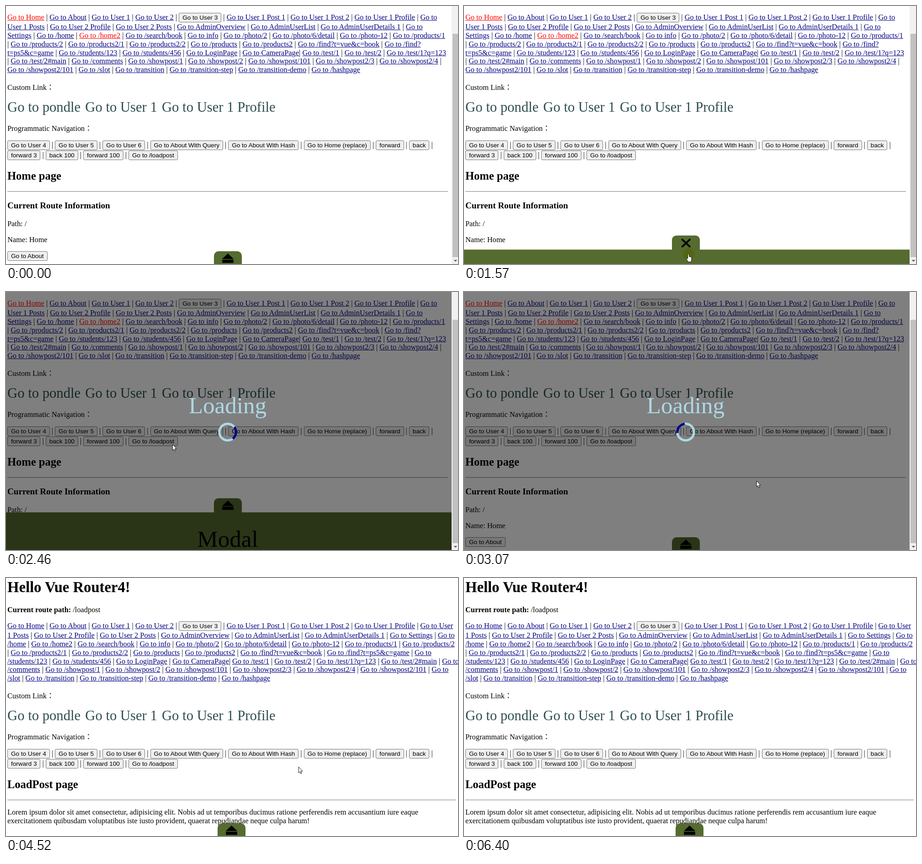
Recreate the animation shown at these times as an HTML page. Size 989x566 px, loop 6.82 s.

```html
<!DOCTYPE html>
<html lang="en">
<head>
<meta charset="utf-8">
<title>Route loading</title>
<style>
html, body { margin: 0; width: 100%; height: 100%; overflow: hidden; background: #fff; }
#stage { position: relative; width: 989px; height: 566px; overflow: hidden; background: #fff;
  font-family: 'Liberation Serif', 'Noto Sans CJK JP', serif; color: #000; }
#stage div, #stage svg { position: absolute; }
.page { inset: 0; }
.line { left: 3px; font-size: 16.35px; line-height: 20px; white-space: pre; }
.line a { color: #000080; text-decoration: underline; }
.line a.on { color: #f00; }
.btn { font: 13.58px/0 'Liberation Sans', sans-serif; padding: 2px 6.9px;
  border: 1px solid #767676; border-radius: 3px; background: #efefef; }
.btn.hover { background: #e5e5e5; border-color: #4f4f4f; }
.btn.down { background: #f5f5f5; border-color: #8d8d8d; }
.big { color: #2f4f4f; margin-right: 10.2px; }
.rule { left: 3px; height: 1px; background: #a6a6a6; border-bottom: 1px solid #c8c8c8; }
#bar { left: 975px; top: 0; width: 14px; height: 566px; background: #f1f1f1; }
#thumb { left: 2px; top: 61px; width: 12px; height: 490px; background: #c1c1c1; }
#tab { top: 420px; width: 61px; height: 32px; border-radius: 10px 10px 0 0; background: #556b2f; }
#panel { left: 0; top: 451px; width: 975px; height: 125px; background: #556b2f; }
.title { left: 0; width: 970px; text-align: center; font-size: 51.1px; line-height: 58px; }
#veil { left: 0; top: 0; width: 975px; height: 566px; background: rgba(0, 0, 0, .5); }
#veil .title { color: #add8e6; top: 220px; }
#glow { width: 25px; height: 25px; margin: -12.5px; border-radius: 50%; background: #faef62; mix-blend-mode: multiply; }
svg { left: 0; top: 0; overflow: visible; }
</style>
</head>
<body>
<div id="stage">
  <div id="home" class="page"></div>
  <div id="post" class="page"></div>
  <div id="modal">
    <div id="tab">
      <svg width="61" height="32">
        <path id="eject" d="M30.5 5L43.2 17H17.8ZM18.2 18.4H42.8V25.6H18.2Z"/>
        <path id="cross" d="M21.5 8L40 25.5M40 8L21.5 25.5" stroke="#000" stroke-width="3.8"/>
      </svg>
    </div>
    <div id="panel"><div class="title" style="top:30px">Modal</div></div>
  </div>
  <div id="veil">
    <div class="title">Loading</div>
    <svg width="975" height="566" fill="none" stroke-width="5.1">
      <circle cx="485" cy="307.3" r="18.2" stroke="#add8e6"/>
      <circle id="arc" cx="485" cy="307.3" r="18.2" stroke="#000080" pathLength="100" stroke-dasharray="25 75"/>
    </svg>
  </div>
  <div id="bar">
    <div id="thumb"></div>
    <svg width="14" height="566"><path d="M4.5 557H12.5L8.5 561Z" fill="#606060"/></svg>
  </div>
  <div id="glow"></div>
  <svg id="cursor" width="20" height="20" fill="#fff" stroke="#000" stroke-width=".9" stroke-linejoin="round">
    <path id="arrow" d="M.2 .4V13.4L3 10.7L4.9 15.2L7 14.3L5.1 9.9H9Z"/>
    <path id="hand" d="M-1.4 9.5V1.2a1.4 1.4 0 0 1 2.8 0V5.6L5.6 6.6Q7.2 7.2 7 9V12.4L5.6 17.4H-.4L-3.6 12.2Q-4.8 10-3.2 9.3Q-2.2 9.2-1.4 10.6Z"/>
    <path id="beam" d="M-2.5 .5H2.5M0 .5V12.5M-2.5 12.5H2.5"/>
  </svg>
</div>
<script>
const LOOP = 6820;
const $ = id => document.getElementById(id);

// "~" breaks the line on the home page, "^" on the post page, "%" breaks without a space.
const LINKS = 'Go to Home | Go to About | Go to User 1 | Go to User 2 | [Go to User 3] | Go to User 1 Post 1 | ' +
  'Go to User 1 Post 2 | Go to User 1 Profile | Go to~User^1 Posts | Go to User 2 Profile | Go to User 2 Posts | ' +
  'Go to AdminOverview | Go to AdminUserList | Go to AdminUserDetails 1 | Go to~Settings | Go to^/home | ' +
  'Go to /home2 | Go to /search/book | Go to info | Go to /photo/2 | Go to /photo/6/detail | Go to /photo-12 | ' +
  'Go to /products/1~| Go to /products/2^| Go to /products2/1 | Go to /products2/2 | Go to /products | ' +
  'Go to /products2 | Go to /find?t=vue&c=book | Go to /find?%t=ps5&c=game | Go to^/students/123 | ' +
  'Go to /students/456 | Go to LoginPage | Go to CameraPage| Go to /test/1 | Go to /test/2 | ' +
  'Go to /test/1?q=123~| Go to /test/2#main | Go to^/comments | Go to /showpost/1 | Go to /showpost/2 | ' +
  'Go to /showpost/101 | Go to /showpost2/3 | Go to /showpost2/4 |~Go to /showpost2/101 | Go to^/slot | ' +
  'Go to /transition | Go to /transition-step | Go to /transition-demo | Go to /hashpage';
const BUTTONS = ['[Go to User 4] | [Go to User 5] | [Go to User 6] | [Go to About With Query] | ' +
  '[Go to About With Hash] | [Go to Home (replace)] | [forward] | [back] |',
  '[forward 3] | [back 100] | [forward 100] | [Go to /loadpost]'];

function markup(line, home) {
  return line.replace(/&/g, '&amp;').replace(/[^|]+/g, part => part.replace(/\S.*\S/, s => {
    if (s[0] === '[') return `<span class="btn">${s.slice(1, -1)}</span>`;
    const on = home && /^Go to (Home|\/home2)$/.test(s);
    return `<a${on ? ' class="on"' : ''}>${s}</a>`;
  }));
}

function build(id, home) {
  const page = $(id), shift = home ? -80 : 0;
  const add = (base, html, size = 16.35, bold = false) => {
    const el = document.createElement('div');
    el.className = 'line';
    el.innerHTML = html;
    const rise = Math.round(size * .891), drop = Math.round(size * .216);
    el.style.cssText = `top:${base + shift - 10 - (rise - drop) / 2}px;font-size:${size}px;font-weight:${bold ? 700 : 400}`;
    page.append(el);
  };
  add(30.9, 'Hello Vue Router4!', 32.7, true);
  add(75.5, `<b>Current route path:</b> ${home ? '/' : '/loadpost'}`);
  const text = home
    ? LINKS.replace(/[~%]/g, '\n').replace(/\^/g, ' ')
    : LINKS.replace(/\^/g, '\n').replace(/~/g, ' ').replace('%', '');
  text.split('\n').forEach((line, i) => add(i ? 112.8 + i * 18.8 : 110.6, markup(line, home)));
  add(264, 'Custom Link：');
  add(312.2, ['Go to pondle', 'Go to User 1', 'Go to User 1 Profile']
    .map(s => `<span class="big">${s}</span>`).join(''), 30.66);
  add(354, 'Programmatic Navigation：');
  BUTTONS.forEach((line, i) => add(390.1 + i * 22, markup(line)));
  add(461, home ? 'Home page' : 'LoadPost page', 24.52, true);
  const rule = document.createElement('div');
  rule.className = 'rule';
  rule.style.cssText = `top:${486 + shift}px;width:${home ? 964 : 981}px`;
  page.append(rule);
  if (home) {
    add(524.5, 'Current Route Information', 19.13, true);
    add(563.5, 'Path: /');
    add(598.6, 'Name: Home');
    add(633.9, markup('[Go to About]'));
  } else {
    add(519.8, 'Lorem ipsum dolor sit amet consectetur, adipisicing elit. Nobis ad ut temporibus ducimus ratione perferendis rem accusantium iure eaque');
    add(538.6, 'exercitationem quibusdam voluptatibus iste iusto provident, quaerat repudiandae neque culpa harum!');
  }
}
build('home', true);
build('post', false);
const loadBtn = [...document.querySelectorAll('#home .btn')].find(b => b.textContent.endsWith('loadpost'));

// Bursts of motion: start, end, number of steps.
const BURSTS = [[0, 0, 1], [260, 890, 10], [960, 1100, 3], [1500, 2130, 10], [2200, 2330, 3], [2460, 2860, 6],
  [2930, 3610, 11], [3680, 4320, 10], [4390, 4520, 3], [5640, 5990, 6], [6260, 6400, 3]];

function snap(t) {
  const [a, b, n] = BURSTS.filter(w => w[0] <= t).pop();
  if (t >= b) return b;
  const step = (b - a) / (n - 1);
  return a + Math.floor((t - a) / step + .001) * step;
}

// Pointer: time, x, y, shape.
const PATH = [[260, 854, 364, 'arrow'], [820, 503, 534, 'hand'], [890, 491, 541, 'hand'], [960, 491, 541, 'hand'],
  [1100, 491, 544, 'hand'], [1570, 491, 544, 'hand'], [1710, 470, 500, 'arrow'], [2100, 354, 331, 'arrow'],
  [2400, 354, 331, 'arrow'], [2930, 640, 414, 'arrow'], [5590, 640, 414, 'arrow'], [5680, 643, 420, 'arrow'],
  [5910, 610, 512, 'beam'], [5990, 605, 522, 'beam'], [6190, 605, 522, 'beam'], [6330, 903, 549, 'arrow'],
  [6400, 903, 549, 'arrow']];

const clamp = v => Math.max(0, Math.min(1, v));
const easeOut = p => 1 - (1 - p) ** 2.3;
const smooth = p => p * p * (3 - 2 * p);
const show = (id, on) => { $(id).style.display = on ? '' : 'none'; };

function pointer(t) {
  const i = PATH.findLastIndex(k => k[0] <= t);
  const a = PATH[i], b = PATH[i + 1] || a;
  const p = smooth(clamp((t - a[0]) / (b[0] - a[0] || 1)));
  return { x: a[1] + (b[1] - a[1]) * p, y: a[2] + (b[2] - a[2]) * p, shape: a[3] };
}

function draw(time) {
  const t = snap(time);
  const loaded = t >= 4520, busy = t >= 2460 && !loaded;
  show('home', !loaded);
  show('post', loaded);
  show('bar', !loaded);
  show('veil', busy);

  const open = easeOut(clamp((t - 1500) / 500)) - easeOut(clamp((t - 2400) / 460));
  $('modal').style.transform = `translateY(${118 * (1 - open)}px)`;
  $('tab').style.left = (loaded ? 463 : 455) + 'px';
  const crossed = t >= 1500 && t < 2460;
  show('cross', crossed);
  show('eject', !crossed);

  const turn = -50 + (t - 3070) * 483 / 1390;
  $('arc').setAttribute('transform', `rotate(${turn - 135} 485 307.3)`);

  const press = t >= 2200 && t < 2460;
  loadBtn.className = 'btn' + (press ? ' down' : t >= 2060 && t < 2200 ? ' hover' : '');

  const visible = t >= 260 && t < 6400;
  show('cursor', visible);
  show('glow', press || (t >= 1500 && t < 1640));
  if (!visible) return;
  const c = pointer(t);
  const at = `translate(${c.x}px,${c.y}px)`;
  $('cursor').style.transform = at;
  $('glow').style.transform = at;
  for (const s of ['arrow', 'hand', 'beam']) show(s, s === c.shape);
}

const begin = performance.now();
function tick() {
  draw((performance.now() - begin) % LOOP);
  requestAnimationFrame(tick);
}
tick();
</script>
</body>
</html>
```
